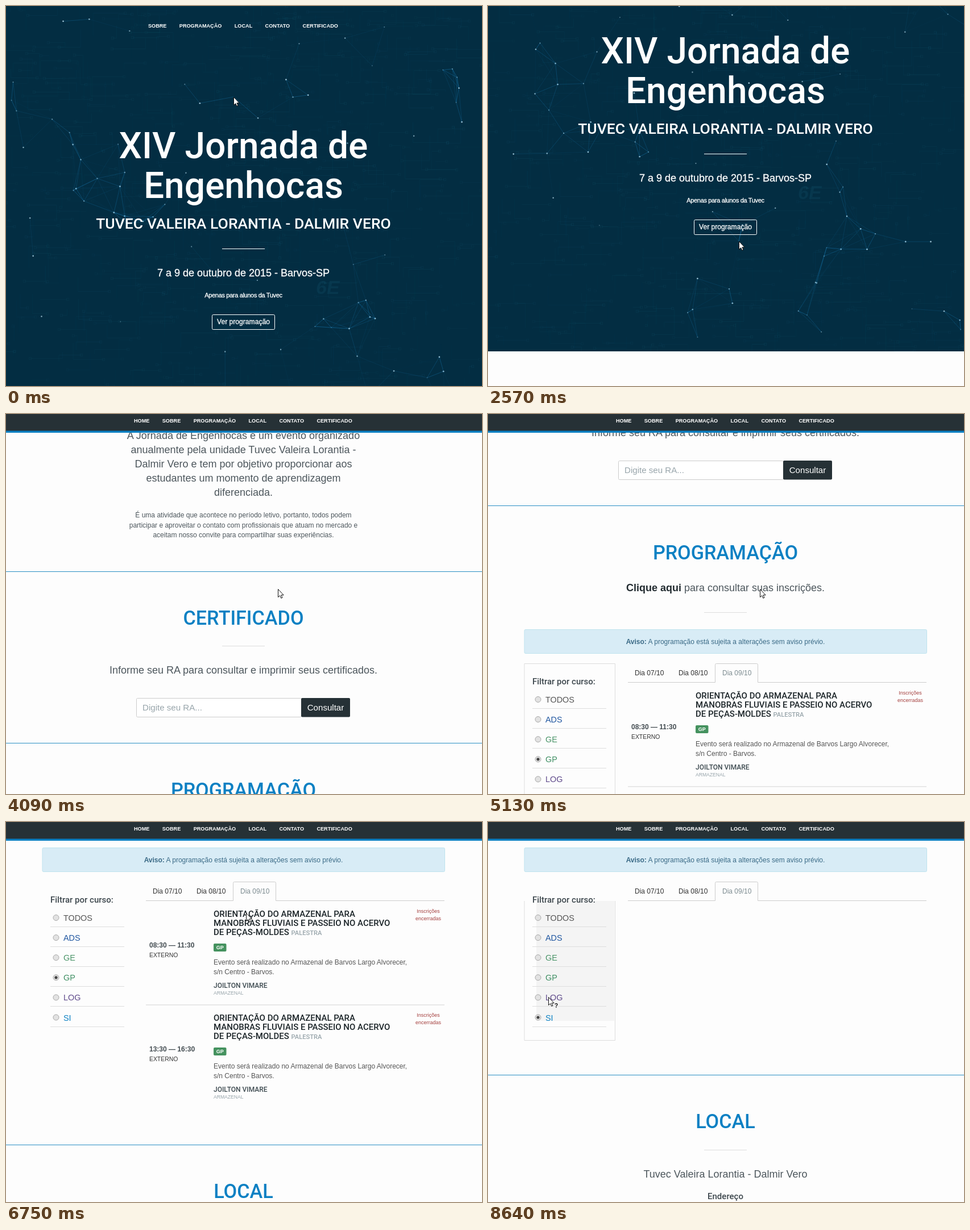
Write an HTML page with a canvas that moves like this. It is 837x669 px and loops after 8740 ms.

```html
<!DOCTYPE html>
<html lang="pt">
<head>
<meta charset="utf-8">
<style>
html, body { margin: 0; width: 100%; height: 100%; overflow: hidden; background: #fdfdfd; }
canvas, svg { position: absolute; left: 0; top: 0; }
text { font-family: "Liberation Sans", Arial, sans-serif; white-space: pre; }
.m { text-anchor: middle; }
.b { font-weight: bold; }
.r { font-family: Roboto, sans-serif; font-weight: 500; }
.w { stroke: #fff; stroke-width: .3px; }
</style>
</head>
<body>
<canvas id="sky" width="837" height="775"></canvas>
<svg id="stage" width="837" height="669"></svg>
<script>
const LOOP = 8740, MID = 417.5, NOTCH = 83.6, HERO = 775;
const BLUE = '#0b80c3', DARK = '#263136', BODY = '#4c565c', MUTED = '#98a5ab';
const $ = id => document.getElementById(id);
const clamp = v => Math.max(0, Math.min(1, v));
const ease = v => v * v * (3 - 2 * v);
const ramp = (t, start, end) => clamp((t - start) / (end - start));

// ---- page markup ----
const txt = (x, y, size, fill, s, cls = '', more = '') =>
  `<text x="${x}" y="${y}" font-size="${size}" fill="${fill}" class="${cls}" ${more}>${s}</text>`;
const lines = (x, y, step, size, fill, list, cls) =>
  list.map((s, i) => txt(x, y + i * step, size, fill, s, cls)).join('');
const box = (x, y, w, h, fill, stroke = 'none', r = 0) =>
  `<rect x="${x}" y="${y}" width="${w}" height="${h}" rx="${r}" fill="${fill}" stroke="${stroke}"/>`;
const group = (id, s, y = 0) => `<g id="${id}" transform="translate(0 ${y})">${s}</g>`;
const rule = (y, fill = '#ddd') => box(380, y, 75, 1, fill);
const divider = y => box(0, y, 837, 1, '#2a8fc4');
const heading = (y, s) => txt(MID, y, 34.2, BLUE, s, 'm r');

const links = ['SOBRE', 'PROGRAMAÇÃO', 'LOCAL', 'CONTATO', 'CERTIFICADO'];
const menu = (x, y, items) =>
  txt(x, y, 9.15, '#fff', items.join('</tspan><tspan dx="22.4">').replace('</tspan>', '') + '</tspan>', 'b');

const hero = menu(250, 37.5, links) +
  lines(MID, 267.5, 70, 64, '#fff', ['XIV Jornada de', 'Engenhocas'], 'm r') +
  txt(MID, 391.5, 26.5, '#fff', 'TUVEC VALEIRA LORANTIA - DALMIR VERO', 'm r') +
  rule(427, '#fff') +
  txt(MID, 476, 18, '#fff', '7 a 9 de outubro de 2015 - Barvos-SP', 'm w') +
  txt(MID, 512.5, 11, '#fff', 'Apenas para alunos da Tuvec', 'm w', 'letter-spacing="-.34"') +
  box(362.5, 543.5, 110, 26, 'none', '#fff', 2) +
  txt(MID, 560, 12.1, '#fff', 'Ver programação', 'm w');

const about = heading(-42, 'SOBRE') + rule(-5) +
  lines(MID, 44, 25, 18, BODY, [
    'A Jornada de Engenhocas é um evento organizado',
    'anualmente pela unidade Tuvec Valeira Lorantia -',
    'Dalmir Vero e tem por objetivo proporcionar aos',
    'estudantes um momento de aprendizagem',
    'diferenciada.'], 'm') +
  lines(MID, 182, 17.6, 12, BODY, [
    'É uma atividade que acontece no período letivo, portanto, todos podem',
    'participar e aproveitar o contato com profissionais que atuam no mercado e',
    'aceitam nosso convite para compartilhar suas experiências.'], 'm') +
  divider(277);

const certificate = heading(371, 'CERTIFICADO') + rule(408) +
  txt(MID, 457, 18, BODY, 'Informe seu RA para consultar e imprimir seus certificados.', 'm') +
  `<rect id="field" x="229.5" y="500.5" width="290" height="33" rx="2" fill="#fff"/>` +
  txt(240, 522, 15.1, MUTED, 'Digite seu RA...') +
  box(519, 500, 86, 33.5, DARK, 'none', 2) +
  txt(562, 522, 15.1, '#fff', 'Consultar', 'm') +
  divider(579);

const courses = [['TODOS', '#555'], ['ADS', '#1f56a0'], ['GE', '#4a9468'],
  ['GP', '#3f8f63'], ['LOG', '#5f4a8b'], ['SI', BLUE]];
const filter =
  `<path id="panel" fill="none" stroke="#ddd"/>` +
  `<rect id="shade" x="85" y="473" width="137" height="211" fill="#f4f4f4"/>` +
  txt(78, 475.5, 15, '#3d474d', 'Filtrar por curso:', 'r') +
  courses.map(([s, c], i) => {
    const y = 502.5 + i * 35.1;
    return `<circle cx="88" cy="${y}" r="5" fill="#e2e2e2" stroke="#a9a9a9"/>` +
      `<circle id="dot${i}" cx="88" cy="${y}" r="2.6" fill="#444"/>` +
      txt(101, y + 5.5, 14.4, c, s) + box(78, Math.round(y + 15.5), 130, 1, '#dedede');
  }).join('');

const tabs =
  `<path d="M246 472.5H399.5V441.5q0 -2 2 -2H472.5q2 0 2 2V472.5H771" fill="none" stroke="#ccc"/>` +
  ['07', '08', '09'].map((d, i) =>
    txt(258 + i * 77, 460, 12, i < 2 ? '#333' : '#7d8c91', `Dia ${d}/10`)).join('');

const talk = (hours, dy) => `<g transform="translate(0 ${dy})">` +
  lines(365, 501, 16, 15, '#1c2529', ['ORIENTAÇÃO DO ARMAZENAL PARA',
    'MANOBRAS FLUVIAIS E PASSEIO NO ACERVO',
    `DE PEÇAS-MOLDES <tspan font-size="11.2" fill="${MUTED}">PALESTRA</tspan>`], 'r') +
  box(365, 548, 22.5, 14, '#45925f', 'none', 2) + txt(376.2, 558.2, 9, '#fff', 'GP', 'm b') +
  lines(365, 584.5, 17.6, 12, '#555', [
    'Evento será realizado no Armazenal de Barvos Largo Alvorecer,', 's/n Centro - Barvos.']) +
  txt(365, 625.5, 12, '#3d4a50', 'JOILTON VIMARE', 'r') +
  txt(365, 638, 8.6, MUTED, 'ARMAZENAL') +
  txt(252, 554.5, 12, '#444d52', hours, 'b') + txt(252, 572, 10.4, '#333', 'EXTERNO') +
  lines(742.5, 494, 13.3, 9, '#a5403f', ['Inscrições', 'encerradas'], 'm') + '</g>';

const schedule = heading(256, 'PROGRAMAÇÃO') +
  txt(MID, 312, 18, BODY, '<tspan class="b" fill="#222b30">Clique aqui</tspan> para consultar suas inscrições.', 'm') +
  rule(349) + box(64, 379.5, 707.5, 42, '#d8ecf6', '#bfe3ee', 2) +
  txt(MID, 405, 12, '#3a6a86', '<tspan class="b">Aviso:</tspan> A programação está sujeita a alterações sem aviso prévio.', 'm') +
  filter + tabs +
  group('talks', talk('08:30 — 11:30', 0) + box(246, 655.5, 525, 1, '#d4d4d4') + talk('13:30 — 16:30', 183)) +
  group('place', divider(902) + heading(996, 'LOCAL') + rule(1034) +
    txt(MID, 1083, 18, BODY, 'Tuvec Valeira Lorantia - Dalmir Vero', 'm') +
    txt(MID, 1121, 15, '#3d474d', 'Endereço', 'm r'));

$('stage').innerHTML =
  group('page', hero + group('text', about + certificate + group('prog', schedule, 418), 920)) +
  group('bar', box(0, 0, 837, 30, DARK) + box(0, 29.5, 837, 3.5, BLUE) +
    menu(225, 15.3, ['HOME', ...links])) +
  `<g id="cursor"><path d="M.5 .5V14.5L3.7 11.6 5.8 16.3 8 15.3 5.9 10.8H10.2Z" fill="#fff" stroke="#111"/>` +
  txt(11, 19, 10, '#111', '?', 'b', 'id="help"') + '</g>';

// ---- hero backdrop ----
let seed = 11;
const rnd = () => (seed = (seed * 16807) % 2147483647) / 2147483647;
const spread = size => (rnd() - .5) * size;
const ctx = $('sky').getContext('2d');

// faint circuit board
const board = document.createElement('canvas');
board.width = 837;
board.height = HERO;
const b = board.getContext('2d');
b.fillStyle = '#032d42';
b.fillRect(0, 0, 837, HERO);
for (let i = 0; i < 700; i++) {
  const x = Math.floor(rnd() * 837) + .5, y = Math.floor(rnd() * HERO) + .5;
  const w = spread(130), h = spread(90);
  b.strokeStyle = b.fillStyle = `rgba(18,92,118,${.05 + rnd() * .1})`;
  b.beginPath();
  b.moveTo(x, y);
  b.lineTo(x + w, y);
  b.lineTo(x + w, y + h);
  b.stroke();
  b.strokeRect(x - 2, y - 2, 4, 4);
}
b.fillStyle = 'rgba(25,95,125,.2)';
b.font = 'italic bold 34px "Liberation Sans", sans-serif';
b.fillText('6E', 545, 507);

// drifting dots, speed in px per second
const dots = Array.from({ length: 85 }, () => ({
  x: rnd() * 837, y: rnd() * HERO, vx: spread(48), vy: spread(48), glow: .25 + rnd() * .6
}));

function link(p, q, reach, strength) {
  const d = Math.hypot(p.x - q.x, p.y - q.y);
  if (d > reach) return;
  ctx.strokeStyle = `rgba(27,133,196,${strength * (1 - d / reach)})`;
  ctx.beginPath();
  ctx.moveTo(p.x, p.y);
  ctx.lineTo(q.x, q.y);
  ctx.stroke();
}

function drawSky(t, mouse) {
  ctx.drawImage(board, 0, 0);
  const now = dots.map(d => ({ x: d.x + d.vx * t / 1000, y: d.y + d.vy * t / 1000, glow: d.glow }));
  now.forEach((p, i) => {
    for (let j = 0; j < i; j++) link(p, now[j], 88, .5);
    link(p, mouse, 90, .9);
    ctx.fillStyle = `rgba(190,225,240,${p.glow})`;
    ctx.beginPath();
    ctx.arc(p.x, p.y, .7 + p.glow * .8, 0, 7);
    ctx.fill();
  });
}

// ---- timeline ----
// wheel bursts: start, notches, gap
const bursts = [[2450, 2, 110], [2810, 9, 140], [4220, 1, 1], [4560, 3, 55], [5125, 1, 1], [6060, 4, 117]];
const notches = t => bursts.reduce((sum, [start, n, gap]) =>
  sum + Math.max(0, Math.min(n, Math.floor((t - start) / gap) + 1)), 0);

// pointer moves: start, end, x, y
const moves = [[500, 1400, 292, 160], [1800, 2300, 441, 414], [2700, 3300, 478, 308], [5250, 5560, 430, 98],
  [5560, 5840, 422, 160], [6800, 7300, 106, 339], [8530, 8630, 106, 308]];
const pointer = t => moves.reduce((p, [start, end, x, y]) => {
  const k = ease(ramp(t, start, end));
  return { x: p.x + (x - p.x) * k, y: p.y + (y - p.y) * k };
}, { x: 400, y: 160 });

const CLICK = 7400;
const set = (id, name, value) => $(id).setAttribute(name, value);
const move = (id, x, y) => set(id, 'transform', `translate(${x} ${y})`);

function frame(now) {
  const t = now % LOOP;
  const scroll = Math.round(NOTCH * notches(t));
  const { x, y } = pointer(t);
  move('page', 0, -scroll);
  $('sky').style.transform = `translateY(${-scroll}px)`;
  if (scroll < HERO) drawSky(t, { x, y: y + scroll });
  move('bar', 0, -33 + 33 * ramp(t, 3850, 4050));
  move('cursor', Math.round(x), Math.round(y));
  set('help', 'opacity', t > 7250 ? 1 : 0);
  const over = t > 5250 && t < 6000 && y > 82 && y < 115;
  set('field', 'stroke', over ? '#8fa3ad' : '#ccc');

  courses.forEach((c, i) => set('dot' + i, 'opacity', i == (t < CLICK ? 3 : 5) ? 1 : 0));
  const late = t >= 7690;
  set('panel', 'd', late ? 'M64 473V718.5H223.5V473' : t < 6740 ? 'M64 439.5H223.5V718.5H64Z' : '');
  set('shade', 'opacity', late ? 1 : 0);
  set('talks', 'opacity', 1 - ramp(t, CLICK, CLICK + 400));
  move('place', 0, -123 * ease(ramp(t, CLICK, CLICK + 800)));
  requestAnimationFrame(frame);
}
requestAnimationFrame(frame);
</script>
</body>
</html>
```
